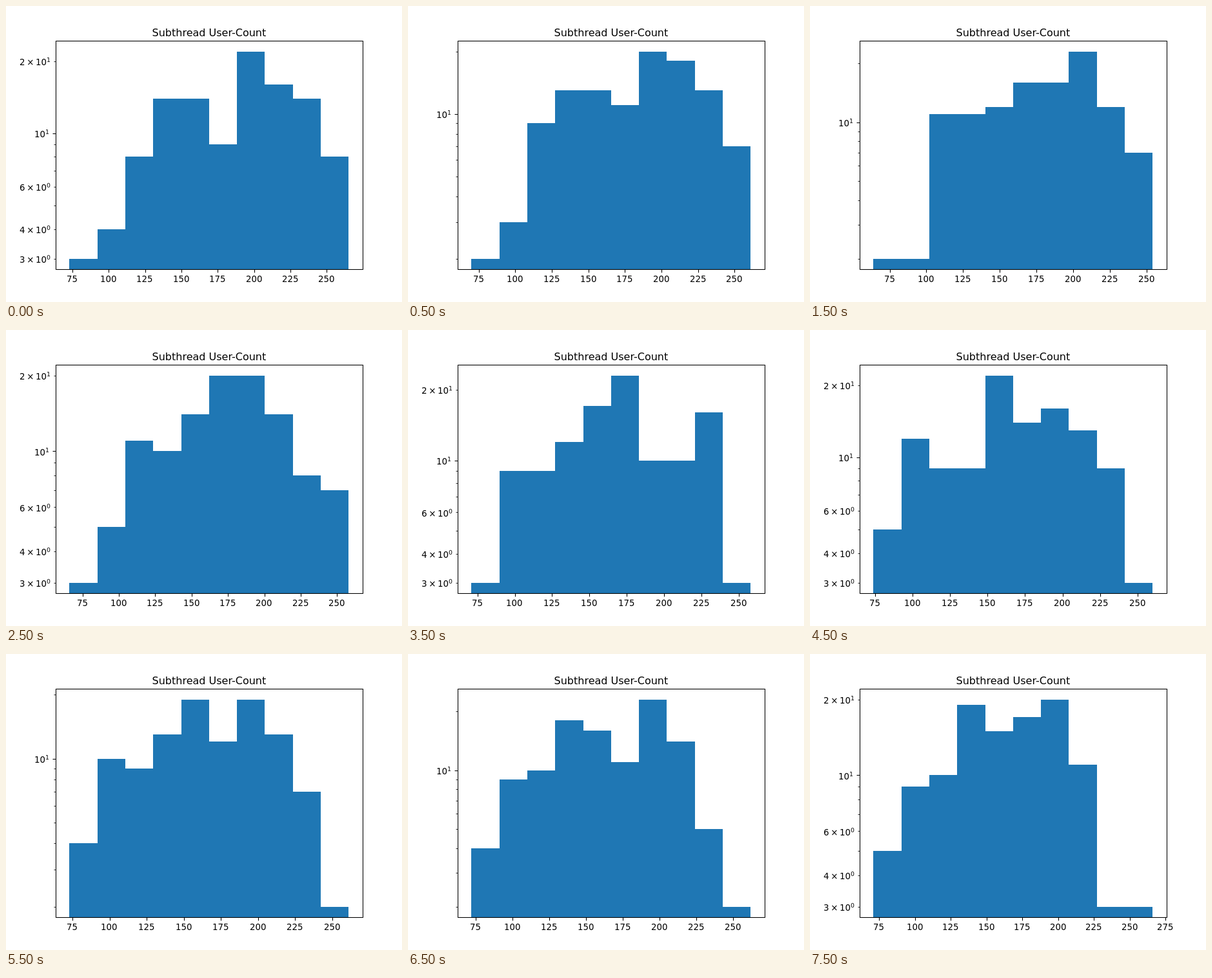
Recreate the animation shown at these times as an HTML page. Size 614 by 460 pixels, loop 8000 ms.

```html
<!DOCTYPE html>
<html lang="en">
<head>
<meta charset="utf-8">
<title>Histogram</title>
<style>
  html, body { margin: 0; width: 100%; height: 100%; overflow: hidden; background: #fff; }
  svg { display: block; font: 13.333px "DejaVu Sans", sans-serif; }
  .bars { fill: #1f77b4; shape-rendering: crispEdges; }
  .major, .minor { stroke: #000; stroke-width: 1.067; fill: none; }
  .minor { stroke-width: .8; }
  .sup { font-size: 9.333px; }
</style>
</head>
<body>
<svg width="614" height="460" viewBox="0 0 614 460">
  <g id="plot"></g>
  <rect class="major" x="77.5" y="54.5" width="476" height="355"/>
  <text x="314.9" y="47" text-anchor="middle" font-size="16">Subthread User-Count</text>
</svg>
<script>
const STEP = 500, STEPS = 16;
const USERS = 112, BINS = 10;
const LEFT = 98.44, SPAN_X = 432.87;   // data area inside the 5% margins
const BASE = 393.18, SPAN_Y = 322.56, FLOOR = 409;
const DIGIT = 8.48;                    // advance of one tick label digit

// Key poses; the last bin holds whoever is left of all users.
const pose = (step, lo, hi, ...bins) => {
  const rest = bins.reduce((left, n) => left - n, USERS);
  return { step, values: [lo, hi, ...bins, rest] };
};
const poses = [
  pose(0, 73, 265, 3, 4, 8, 14, 14, 9, 22, 16, 14),
  pose(3, 64, 254, 2, 2, 11, 11, 12, 16, 16, 23, 12),
  pose(5, 66, 258, 3, 5, 11, 10, 14, 20, 20, 14, 8),
  pose(7, 71, 258, 3, 9, 9, 12, 17, 23, 10, 10, 16),
  pose(9, 74, 260, 5, 12, 9, 9, 22, 14, 16, 13, 9),
  pose(13, 72, 262, 4, 9, 10, 18, 16, 11, 23, 14, 5),
  pose(15, 71, 266, 5, 9, 10, 19, 15, 17, 20, 11, 3),
];

// Whole-number blend of the poses on either side of a step.
function valuesAt(step) {
  const b = poses.find(p => p.step >= step);
  const a = poses.findLast(p => p.step <= step);
  const mix = (step - a.step) / (b.step - a.step || 1);
  return a.values.map((v, k) => Math.floor(v + (b.values[k] - v) * mix));
}

const line = (type, x1, y1, x2, y2) =>
  `<path class="${type}" d="M${x1} ${y1}L${x2} ${y2}"/>`;

function powerLabel(digit, exp, x, y) {
  const factor = digit > 1
    ? `<tspan x="${x - 25}">${digit}</tspan><tspan x="${x - 13.8}">×</tspan>` : "";
  return `<text y="${y}">${factor}<tspan x="${x}">10</tspan>` +
    `<tspan class="sup" x="${x + 17}" dy="-5">${exp}</tspan></text>`;
}

function draw(step) {
  const [lo, hi, ...counts] = valuesAt(step);
  const min = Math.min(...counts), max = Math.max(...counts);
  const decades = Math.log10(max / min);
  const xOf = v => LEFT + SPAN_X * (v - lo) / (hi - lo);
  const yOf = n => BASE - SPAN_Y * Math.log10(n / min) / decades;
  const edge = k => Math.round(LEFT + SPAN_X * k / BINS);

  let out = '<path class="bars" d="';
  counts.forEach((n, k) => {
    out += `M${edge(k)} ${FLOOR}V${Math.round(yOf(n))}H${edge(k + 1)}V${FLOOR}Z`;
  });
  out += '"/>';

  for (let v = 50; v <= 300; v += 25) {
    const x = xOf(v);
    if (x < 76.8 || x > 553) continue;
    const px = Math.round(x) + .5;
    const start = Math.floor(x - DIGIT * String(v).length / 2);
    out += line("major", px, 409.5, px, 414.5) + `<text x="${start}" y="429">${v}</text>`;
  }

  for (const exp of [0, 1]) for (let digit = 1; digit < 10; digit++) {
    const y = yOf(digit * 10 ** exp);
    if (y < 54.5 || y > 409.3) continue;
    const py = Math.round(y) + .5, baseline = Math.floor(y + 6.7);
    const major = digit === 1;
    out += line(major ? "major" : "minor", 77.5, py, major ? 72.5 : 74.5, py);
    if (major) out += powerLabel(1, exp, 44, baseline);
    else if (decades * 1.1 <= 1 && [2, 3, 4, 6].includes(digit))
      out += powerLabel(digit, exp, 46, baseline);
  }
  plot.innerHTML = out;
}

const plot = document.getElementById("plot");
let shown = -1;

function tick() {
  const step = Math.floor(performance.now() / STEP) % STEPS;
  if (step !== shown) draw(shown = step);
  requestAnimationFrame(tick);
}
tick();
</script>
</body>
</html>
```
